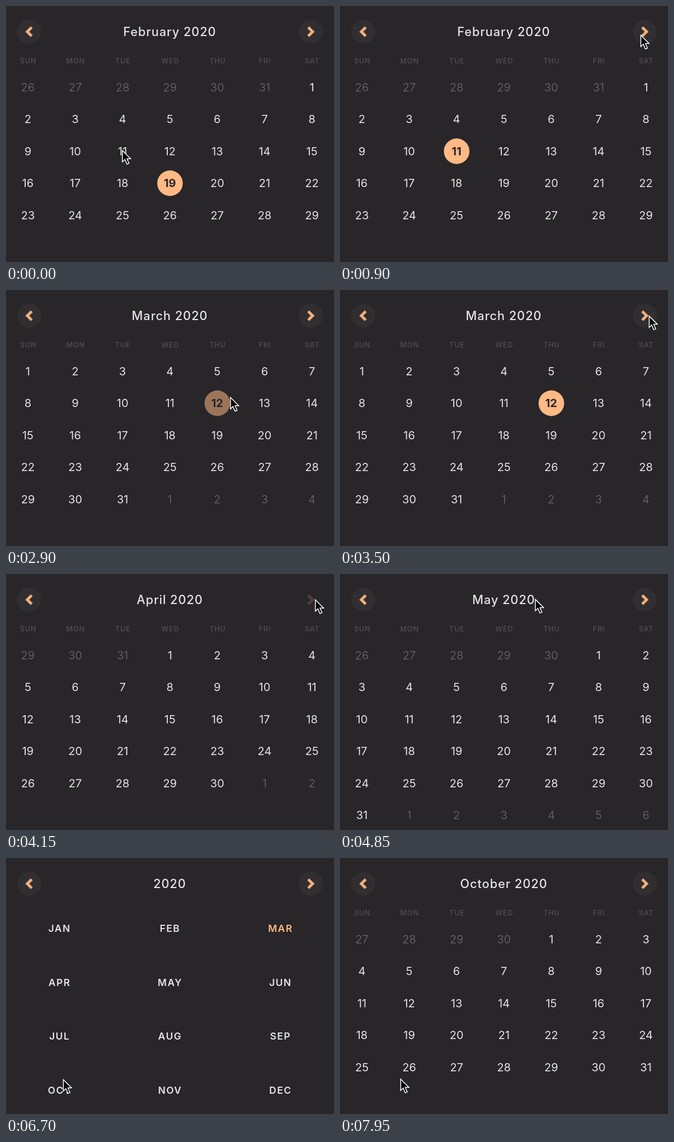
An HTML page that plays this animation: 600 by 468 pixels, repeating every 8000 ms.

```html
<!DOCTYPE html>
<html lang="en">
<head>
<meta charset="utf-8">
<title>Calendar</title>
<style>
html, body { margin: 0; width: 100%; height: 100%; overflow: hidden; background: #282629; }
svg { display: block; width: 100%; height: 100%; font-family: Inter, "Open Sans", sans-serif; }
text { text-anchor: middle; fill: #e4e4e4; }
.title { font-size: 22.2px; font-weight: 500; letter-spacing: 1px; }
.week { font-size: 13px; font-weight: 600; letter-spacing: .8px; fill: #4a494c; }
.day { font-size: 20.5px; }
.out { font-weight: 300; fill: #6c6b6d; }
.on { font-weight: 700; fill: #282629; }
.month { font-size: 17.8px; font-weight: 600; letter-spacing: 1.5px; }
.hot { fill: #ffb985; }
.edge, .arrow { fill: none; stroke: #8c6a50; stroke-width: 5.8; }
.arrow { stroke: #f3b07e; stroke-width: 4.4; }
</style>
</head>
<body>
<svg viewBox="0 0 600 468">
  <g id="view"></g>
  <path id="cursor" d="M1 1.2V22L5.6 17.5L9.3 26.2L13 24.7L9.3 16.2H16Z" fill="#000" stroke="#fff" stroke-width="1.5"/>
</svg>
<script>
const LOOP = 8000, YEAR = 2020, DIM = 0.2, RESTORE = 220;

// The user's session: glide to a point during `move`, hold the named part during `tap`
const STEPS = [
  { to: [212, 263], tap: [50, 150], part: 'day', n: 11 },
  { to: [553, 50], move: [200, 1100], tap: [1250, 1400], part: 'next' },
  { to: [409, 196], move: [1900, 2500], tap: [2650, 2800], part: 'day', n: 12 },
  { to: [565, 46], move: [2900, 3600], tap: [3650, 3750], part: 'next' },
  { tap: [4150, 4550], part: 'next' },
  { to: [309, 45], move: [4550, 5250], tap: [5300, 5550], part: 'title' },
  { to: [472, 128], move: [5600, 6350] },
  { to: [100, 407], move: [6350, 6800], tap: [7150, 7250], part: 'month', n: 9 },
  { to: [110, 403], move: [7900, 7950] }
];

// What a finished tap does to the calendar
const ACTIONS = {
  day: (s, n) => { s.picked = [s.month, n]; },
  next: s => { s.month++; },
  title: s => { s.picking = true; },
  month: (s, n) => { s.month = n; s.picking = false; }
};

const view = document.getElementById('view');
const cursor = document.getElementById('cursor');
const clamp = p => Math.min(1, Math.max(0, p));
const easeOut = p => 1 - (1 - p) ** 3;
const easeInOut = p => p < 0.5 ? 2 * p * p : 1 - 2 * (1 - p) ** 2;
const text = (cls, x, y, s) => `<text class="${cls}" x="${x}" y="${y}">${s}</text>`;
const monthName = m => new Date(YEAR, m, 1).toLocaleString('en-US', { month: 'long' });
const dayName = d => new Date(YEAR, 1, 2 + d).toLocaleString('en-US', { weekday: 'short' });

// Replays the session up to time t
function replay(t) {
  const s = { month: 1, picked: [1, 19], picking: false, alpha: {}, x: 0, y: 0 };
  for (const { to, move: [go, stop] = [-1, 0], tap: [down, up] = [LOOP, LOOP], part, n } of STEPS) {
    if (to) {
      const k = easeOut(clamp((t - go) / (stop - go)));
      s.x += (to[0] - s.x) * k;
      s.y += (to[1] - s.y) * k;
    }
    if (t >= down) s.alpha[part + (n ?? '')] = DIM + (1 - DIM) * easeInOut(clamp((t - up) / RESTORE));
    if (t >= up) ACTIONS[part](s, n);
  }
  return s;
}

const touch = (s, id, body) => `<g opacity="${s.alpha[id] ?? 1}">${body}</g>`;

function button(s, id, x, dir) {
  const d = `M${x - 4.7 * dir} 39l${8 * dir} 8l${-8 * dir} 8`;
  return touch(s, id, `<circle cx="${x}" cy="47" r="22" fill="#302e31"/>
    <path class="edge" d="${d}"/><path class="arrow" d="${d}"/>`);
}

function days(s) {
  const first = new Date(YEAR, s.month, 1).getDay();
  const count = new Date(YEAR, s.month + 1, 0).getDate();
  const column = i => 40.2 + 86.6 * (i % 7);
  let out = '';
  for (let i = 0; i < 7; i++) out += text('week', column(i) + 0.4, 104.6, dayName(i).toUpperCase());
  for (let i = 0; i < Math.ceil((first + count) / 7) * 7; i++) {
    const n = i - first + 1;
    const on = s.month === s.picked[0] && n === s.picked[1];
    const x = column(i), y = 148.5 + 58.5 * Math.floor(i / 7);
    const disc = on ? `<circle class="hot" cx="${x}" cy="${y}" r="23.4"/>` : '';
    const cls = on ? 'day on' : n > 0 && n <= count ? 'day' : 'day out';
    out += touch(s, 'day' + n, disc + text(cls, x - 0.2, y + 7.4, new Date(YEAR, s.month, n).getDate()));
  }
  return out;
}

function months(s) {
  let out = '';
  for (let m = 0; m < 12; m++) {
    const x = 98 + 202.1 * (m % 3), y = 135 + 98.7 * Math.floor(m / 3);
    const cls = m === s.picked[0] ? 'month hot' : 'month';
    out += touch(s, 'month' + m, text(cls, x, y, monthName(m).slice(0, 3).toUpperCase()));
  }
  return out;
}

function draw(t) {
  const s = replay(t);
  const title = s.picking ? YEAR : `${monthName(s.month)} ${YEAR}`;
  view.innerHTML = button(s, 'prev', 42.3, -1) + button(s, 'next', 557.6, 1) +
    touch(s, 'title', text('title', 299.6, 55, title)) + (s.picking ? months(s) : days(s));
  cursor.setAttribute('transform', `translate(${s.x} ${s.y})`);
}

function tick() {
  draw(performance.now() % LOOP);
  requestAnimationFrame(tick);
}
tick();
</script>
</body>
</html>
```
